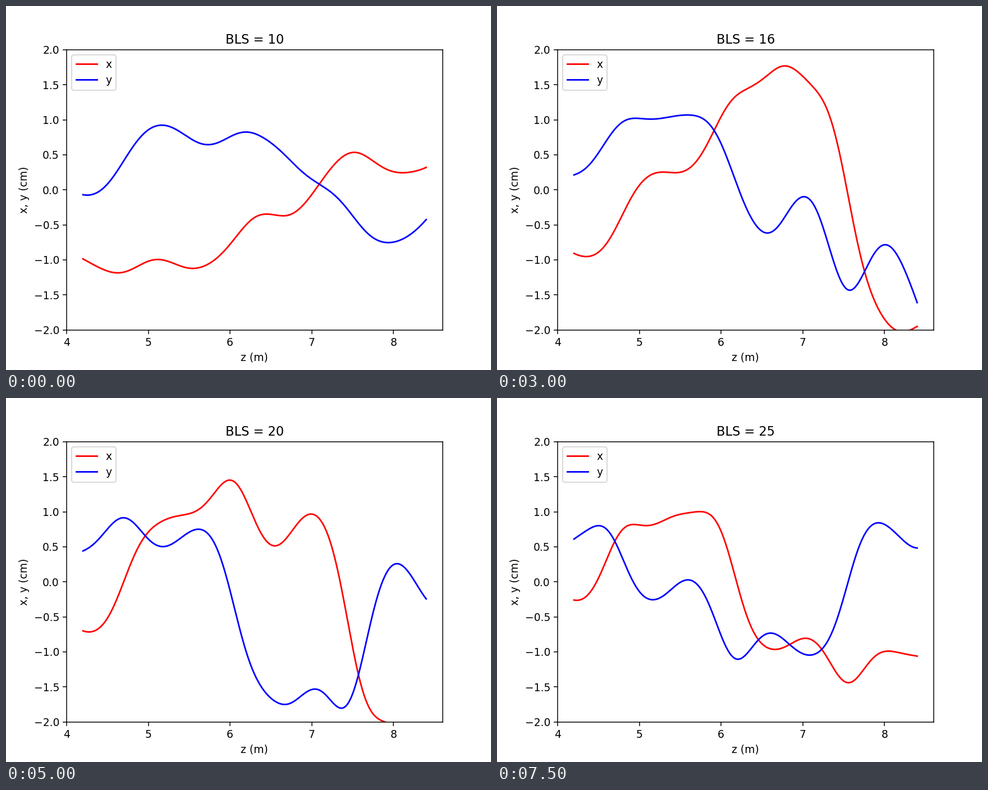
A matplotlib script for the animation above (8000 ms loop, 864 by 648 pixels).

```python
import numpy as np
import matplotlib.pyplot as plt
from matplotlib.animation import FuncAnimation

plt.rcParams["font.family"] = "DejaVu Sans"

Z0, Z1 = 4.2, 8.4
FIRST, LAST = 10, 25

# Solenoid row: turning rate per unit of BLS, strongest at each coil centre.
PITCH, CENTRE = 1.38, 4.72
MEAN, RIPPLE = -0.056, -0.088

# Key orbit points x + iy (cm) at even steps in z, for a few settings.
KEYS = {
    10: [-.985-.07j, -1.185+.27j, -1.005+.885j, -1.11+.773j, -.93+.687j, -.395+.803j,
         -.36+.44j, .16+.045j, .53-.46j, .265-.75j, .32-.425j],
    14: [-.957+.103j, -.93+.588j, -.27+1.075j, -.228+1.05j, .185+.97j, 1.105+.345j,
         1.405+.282j, 1.075+.268j, .20-1.11j, -1.275-1.10j, -1.137-1.803j],
    16: [-.907+.213j, -.73+.74j, .12+1.015j, .245+1.057j, .765+.905j, 1.43-.235j,
         1.755-.49j, 1.45-.225j, -.115-1.43j, -1.81-.79j, -1.95-1.61j],
    21: [-.627+.49j, -.10+.885j, .85+.41j, 1.053+.53j, 1.385+.18j, .585-1.43j,
         .21-1.765j, .42-1.735j, -1.51-1.145j, -1.93+.46j, -2.21+.063j],
    25: [-.26+.61j, .375+.725j, .805-.19j, .952-.04j, .945-.40j, -.435-1.045j,
         -.955-.78j, -.85-1.035j, -1.44+.02j, -1.0+.83j, -1.06+.483j],
}


def turn(z, bls):
    """Unit rotation collected along z, one row per BLS value."""
    k = 2 * np.pi / PITCH
    angle = MEAN * (z - Z0) + RIPPLE / k * np.sin(k * (z - CENTRE))
    return np.exp(1j * np.outer(bls, angle))


def spline(t, v, q):
    """Not-a-knot cubic spline through v(t) along the first axis, taken at q."""
    h = np.diff(t)
    slope = np.diff(v, axis=0) / h[:, None]
    a = np.zeros((len(t), len(t)))
    rhs = np.zeros_like(v)
    for i in range(1, len(t) - 1):
        a[i, i - 1:i + 2] = h[i - 1], 2 * (h[i - 1] + h[i]), h[i]
        rhs[i] = 6 * (slope[i] - slope[i - 1])
    a[0, :3] = h[1], -(h[0] + h[1]), h[0]
    a[-1, -3:] = h[-1], -(h[-2] + h[-1]), h[-2]
    m = np.linalg.solve(a, rhs)

    i = np.clip(np.searchsorted(t, q, side="right") - 1, 0, len(h) - 1)
    d, w = (q - t[i])[:, None], h[i][:, None]
    b = slope[i] - w * (2 * m[i] + m[i + 1]) / 6
    return v[i] + d * (b + d * (m[i] / 2 + d * (m[i + 1] - m[i]) / (6 * w)))


# In the co-rotating frame the orbits vary slowly, so few keys are enough.
key_bls = np.array(list(KEYS), float)
key_w = np.array(list(KEYS.values()))
key_z = np.linspace(Z0, Z1, key_w.shape[1])
bls = np.arange(FIRST, LAST + 1)
z = np.linspace(Z0, Z1, 421)

slow = spline(key_bls, key_w / turn(key_z, key_bls), bls)
orbits = spline(key_z, slow.T, z).T * turn(z, bls)

fig, ax = plt.subplots(figsize=(6.4, 4.8), dpi=135)
line_x, = ax.plot(z, orbits[0].real, "r", label="x")
line_y, = ax.plot(z, orbits[0].imag, "b", label="y")
ax.set(xlim=(4, 8.6), ylim=(-2, 2), xlabel="z (m)", ylabel="x, y (cm)")
ax.set_xticks(range(4, 9))
ax.legend(loc="upper left")
title = ax.set_title(f"BLS = {FIRST}")


def draw(n):
    line_x.set_ydata(orbits[n].real)
    line_y.set_ydata(orbits[n].imag)
    title.set_text(f"BLS = {bls[n]}")
    return line_x, line_y, title


anim = FuncAnimation(fig, draw, frames=len(bls), interval=500, repeat=True)
plt.show()
```
